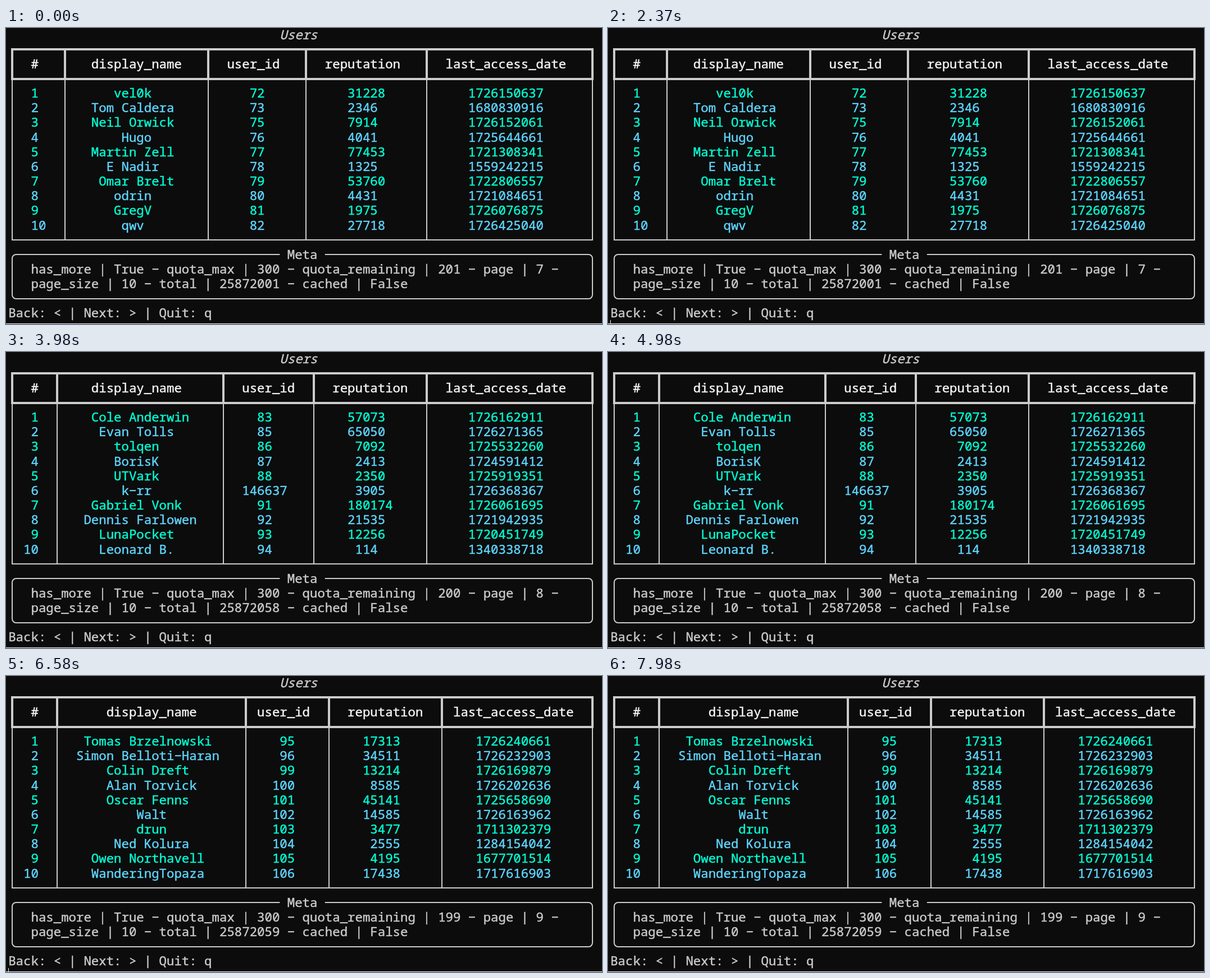
An HTML page with a canvas that plays this animation: 1061 px wide and 528 px high, repeating every 8 s.

```html
<!DOCTYPE html>
<html lang="en">
<head>
<meta charset="utf-8">
<title>Users</title>
<style>
  html, body { margin: 0; width: 100%; height: 100%; overflow: hidden; background: #0c0c0c; }
  canvas { display: block; width: 1061px; height: 528px; }
</style>
</head>
<body>
<canvas id="stage" width="1061" height="528"></canvas>
<script>
const ctx = document.getElementById('stage').getContext('2d');

const LOOP = 8000;
const CELL_W = 13.42, CELL_H = 26.15, LEFT = 4.2, MIDDLE = 12.1;
const LIGHT = 2, HEAVY = 4;
const BACK = '#0c0c0c', GRAY = '#cccccc', WHITE = '#f6f6f6';
const ROW_COLORS = ['#00ffd7', '#5fd7ff'];
const FONT = '22.35px "Noto Sans Mono", "DejaVu Sans Mono", monospace';
const HEADINGS = ['#', 'display_name', 'user_id', 'reputation', 'last_access_date'];
const CURSOR_TOGGLES = [1180, 1780, 2370, 3360, 4580, 4980, 5580, 6380, 6580, 6780, 7380, 7980];

// edges: the terminal columns that hold vertical rules
const PAGES = [
  {
    start: 0, edges: [0, 7, 26, 39, 55, 77], page: 7, quota: 201, total: 25872001,
    rows: `vel0k,72,31228,1726150637
Tom Caldera,73,2346,1680830916
Neil Orwick,75,7914,1726152061
Hugo,76,4041,1725644661
Martin Zell,77,77453,1721308341
E Nadir,78,1325,1559242215
Omar Brelt,79,53760,1722806557
odrin,80,4431,1721084651
GregV,81,1975,1726076875
qwv,82,27718,1726425040`
  },
  {
    start: 3980, edges: [0, 6, 28, 40, 55, 77], page: 8, quota: 200, total: 25872058,
    rows: `Cole Anderwin,83,57073,1726162911
Evan Tolls,85,65050,1726271365
tolqen,86,7092,1725532260
BorisK,87,2413,1724591412
UTVark,88,2350,1725919351
k−rr,146637,3905,1726368367
Gabriel Vonk,91,180174,1726061695
Dennis Farlowen,92,21535,1721942935
LunaPocket,93,12256,1720451749
Leonard B.,94,114,1340338718`
  },
  {
    start: 6580, edges: [0, 6, 31, 42, 57, 77], page: 9, quota: 199, total: 25872059,
    rows: `Tomas Brzelnowski,95,17313,1726240661
Simon Belloti−Haran,96,34511,1726232903
Colin Dreft,99,13214,1726169879
Alan Torvick,100,8585,1726202636
Oscar Fenns,101,45141,1725658690
Walt,102,14585,1726163962
drun,103,3477,1711302379
Ned Kolura,104,2555,1284154042
Owen Northavell,105,4195,1677701514
WanderingTopaza,106,17438,1717616903`
  }
];

const colX = col => LEFT + CELL_W * col;
const rowY = row => MIDDLE + CELL_H * row;
// rules sit on whole pixels so that they stay crisp
const ruleX = col => Math.round(colX(col + 0.5));
const ruleY = row => Math.round(rowY(row));

function write(text, col, row, color, style = '') {
  ctx.font = `${style} ${FONT}`;
  ctx.fillStyle = ctx.strokeStyle = color;
  ctx.lineWidth = 0.45;
  const baseline = Math.round(rowY(row) + 7.5);
  [...text].forEach((char, i) => {
    if (char === ' ') return;
    ctx.fillText(char, colX(col + i), baseline);
    ctx.strokeText(char, colX(col + i), baseline);
  });
}

function writeCells(cells, edges, row, color) {
  cells.forEach((cell, i) => {
    const first = edges[i] + 1;
    const space = edges[i + 1] - first - cell.length;
    write(cell, first + Math.floor(space / 2), row, color);
  });
}

function line(x1, y1, x2, y2, width) {
  ctx.strokeStyle = GRAY;
  ctx.lineWidth = width;
  ctx.lineCap = 'square';
  ctx.beginPath();
  ctx.moveTo(x1, y1);
  ctx.lineTo(x2, y2);
  ctx.stroke();
}

function drawTable({ edges, rows }) {
  const left = ruleX(0), right = ruleX(77);
  const top = ruleY(1), split = ruleY(3), bottom = ruleY(14);
  for (const edge of edges) {
    const x = ruleX(edge);
    line(x, top, x, split, HEAVY);
    line(x, split, x, bottom, LIGHT);
  }
  line(left, top, right, top, HEAVY);
  line(left, split, right, split, HEAVY);
  line(left, bottom, right, bottom, LIGHT);

  writeCells(HEADINGS, edges, 2, WHITE);
  rows.split('\n').forEach((row, i) =>
    writeCells([String(i + 1), ...row.split(',')], edges, 4 + i, ROW_COLORS[i % 2]));
}

function drawMeta({ page, quota, total }) {
  const x = ruleX(0), y = ruleY(15);
  ctx.strokeStyle = GRAY;
  ctx.lineWidth = LIGHT;
  ctx.beginPath();
  ctx.roundRect(x, y, ruleX(77) - x, ruleY(18) - y, 7);
  ctx.stroke();
  ctx.fillStyle = BACK;
  ctx.fillRect(colX(36), y - 3, CELL_W * 6, 6);
  write('Meta', 37, 15, GRAY);
  write(`has_more | True − quota_max | 300 − quota_remaining | ${quota} − page | ${page} −`, 3, 16, GRAY);
  write(`page_size | 10 − total | ${total} − cached | False`, 3, 17, GRAY);
}

function draw(time) {
  const page = PAGES.findLast(p => time >= p.start);
  ctx.fillStyle = BACK;
  ctx.fillRect(0, 0, 1061, 528);
  write('Users', 36, 0, GRAY, 'italic');
  drawTable(page);
  drawMeta(page);
  write('Back: < | Next: > | Quit: q', 0, 19, GRAY);

  ctx.fillStyle = WHITE;
  ctx.fillRect(0, 527, 1061, 1);
  const toggles = CURSOR_TOGGLES.filter(t => time >= t).length;
  if (toggles % 2) ctx.fillRect(4, 521, 1, 6);
}

const begin = performance.now();
function tick() {
  draw((performance.now() - begin) % LOOP);
  requestAnimationFrame(tick);
}
tick();
</script>
</body>
</html>
```
